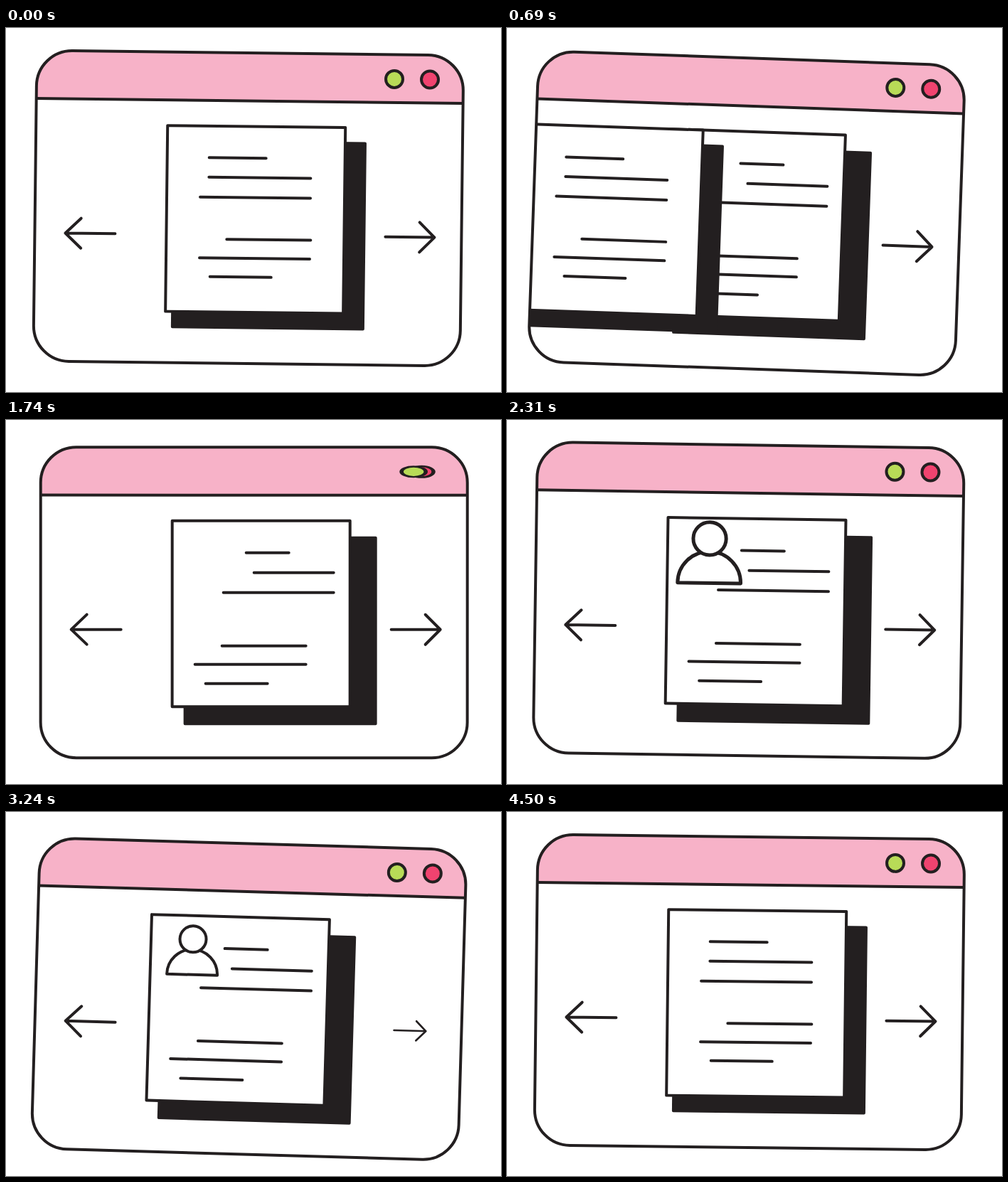
Write an HTML page that moves like this. It is 696 px wide and 512 px high and loops after 4530 ms.

```html
<!DOCTYPE html>
<html lang="en">
<head>
<meta charset="utf-8">
<title>Browser carousel</title>
<style>
  html, body { margin: 0; width: 100%; height: 100%; overflow: hidden; background: #fff; }
  svg { display: block; width: 100vw; height: 100vh; }
  .ink { fill: none; stroke: #231f20; stroke-width: 4; stroke-linecap: round; stroke-linejoin: round; }
  .paper { fill: #fff; }
  .shadow { fill: #231f20; }
</style>
</head>
<body>
<svg viewBox="0 0 696 512">
  <defs>
    <clipPath id="frame"><rect x="49" y="38.5" width="600" height="437" rx="50"/></clipPath>
  </defs>
  <g id="window">
    <g clip-path="url(#frame)">
      <rect class="paper" x="49" y="38" width="600" height="438"/>
      <rect x="49" y="38" width="600" height="68" fill="#f7b2c8"/>
      <path class="ink" d="M49 106H649"/>
      <path class="ink" id="left" d="M162 295H92M114 274L92 295L114 316"/>
      <path class="ink" id="right" d="M542 295H611M590 274L611 295L590 316"/>
      <g id="cardB">
        <rect class="shadow" x="250" y="164" width="272" height="265.5" rx="2"/>
        <rect class="ink paper" x="234" y="142" width="250" height="261.5"/>
        <path class="ink" d="M338 187H398M349 215H461M306 243H461M304 318H422M266 344H422M281 371H368"/>
        <g id="person" class="ink paper">
          <path d="M257.5 225A35.5 35.5 0 0 1 328.5 225Z"/>
          <circle cx="293" cy="175" r="18.5"/>
        </g>
      </g>
      <g id="cardA">
        <rect class="shadow" x="242" y="162" width="272" height="265" rx="2"/>
        <rect class="ink paper" x="234" y="142" width="250" height="261.5"/>
        <path class="ink" d="M293 186.5H373M293 214H436M281 242H436M319 301H437M281 327.5H436M296 354H382"/>
      </g>
    </g>
    <rect class="ink" x="49" y="38.5" width="600" height="437" rx="50"/>
    <circle class="ink" id="red" r="12" style="fill:#f0436f"/>
    <circle class="ink" id="green" r="12" style="fill:#b8db57"/>
  </g>
</svg>
<script>
const LOOP = 4530, END = 4500, SWAY = 2250;
const ids = ['window', 'left', 'right', 'cardA', 'cardB', 'person', 'red', 'green'];
const el = Object.fromEntries(ids.map(id => [id, document.getElementById(id)]));
const put = (id, value) => el[id].setAttribute('transform', value);

const smooth = p => (1 - Math.cos(Math.PI * p)) / 2;
const swing = (t, peak) => Math.cos(2 * Math.PI * (t - peak) / SWAY);

// Eased value from a list of [time, value] keys
function track(t, keys) {
  if (t <= keys[0][0]) return keys[0][1];
  for (let i = 1; i < keys.length; i++) {
    const [t0, a] = keys[i - 1], [t1, b] = keys[i];
    if (t < t1) return a + (b - a) * smooth((t - t0) / (t1 - t0));
  }
  return keys[keys.length - 1][1];
}

const scaleAt = (x, y, s) => `translate(${x} ${y}) scale(${s}) translate(${-x} ${-y})`;
const press = (t, at) => track(t, [[at - 120, 1], [at, 0.65], [at + 150, 1]]);

// Swaps places and back, stretching while moving
function dot(id, t, from, to, start) {
  const p = track(t, [[start, 0], [start + 240, 1], [start + 340, 1], [start + 580, 0]]);
  const s = Math.sin(Math.PI * p);
  put(id, `translate(${from + (to - from) * p} 73) scale(${1 + 0.43 * s} ${1 - 0.4 * s})`);
}

function draw(t) {
  const x = -6.5 + 6.7 * swing(t, 1600);
  const y = 1.3 + 4.9 * swing(t, 1060);
  const angle = 1 + swing(t, 682);
  put('window', `translate(${x} ${y}) rotate(${angle} 349 257)`);

  put('left', scaleAt(127, 295, press(t, 450)));
  put('right', scaleAt(576.5, 295, press(t, 3240)));

  const ax = track(t, [[330, 0], [450, 25], [980, -500], [3250, -500], [3560, 0]]);
  const bx = track(t, [[420, 425], [680, 0], [3120, 0], [3240, -25], [3770, 425]]);
  put('cardA', `translate(${ax} 0)`);
  put('cardB', `translate(${bx} 0)`);

  put('person', scaleAt(293, 191, track(t, [[2100, 0], [2310, 1.25], [2460, 1]])));
  dot('green', t, 552, 602, 1632);
  dot('red', t, 602, 552, 1645);
}

function tick() {
  draw(Math.min(performance.now() % LOOP, END));
  requestAnimationFrame(tick);
}
tick();
</script>
</body>
</html>
```
